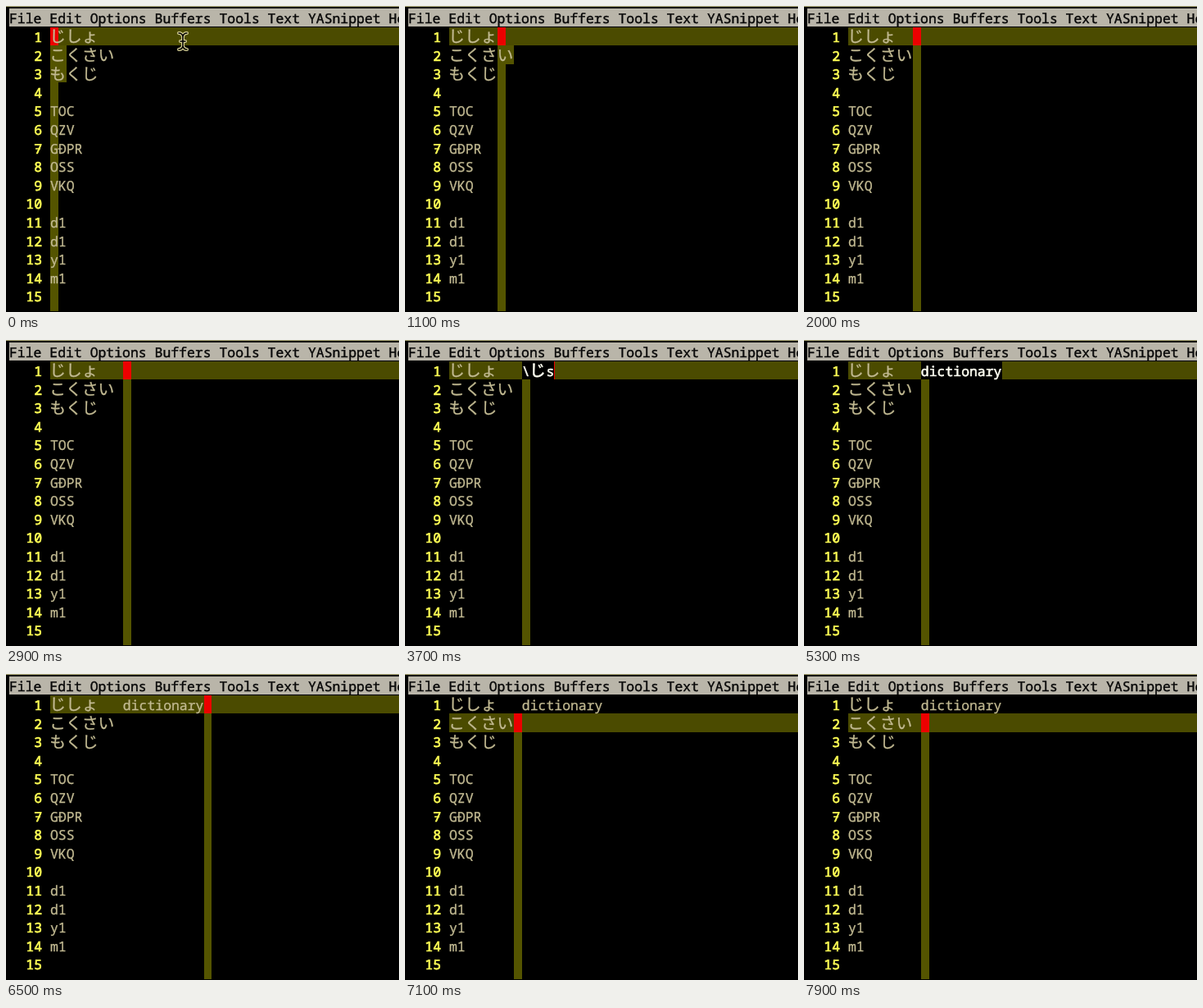
An HTML page for the animation above (8 s loop, 480 by 373 pixels).

```html
<!DOCTYPE html>
<html lang="ja">
<head>
<meta charset="utf-8">
<title>Dictionary input in a text editor</title>
<style>
  html, body { margin: 0; width: 100%; height: 100%; overflow: hidden; background: #000; }
  svg { display: block; width: 480px; height: 373px; }
  text { white-space: pre; text-rendering: geometricPrecision; fill: #c2ba92; stroke: #c2ba92; stroke-width: 0.3; }
  rect { shape-rendering: crispEdges; }
  .mono { font: 16.45px 'Noto Sans Mono', 'DejaVu Sans Mono', monospace; }
  .kana { font: 19.74px 'Noto Sans CJK JP', 'Noto Sans CJK', sans-serif; }
  .menu { fill: #080808; stroke: #080808; stroke-width: 0.4; }
  .num { fill: #ffff55; stroke: #ffff55; stroke-width: 0.7; }
  .typed text { fill: #fffff2; stroke: #fffff2; stroke-width: 0.6; }
  .list text { font: 19.1px Inter, 'Liberation Sans', sans-serif; fill: #000; stroke: none; }
  .list .tag { font: 16.5px Inter, 'Noto Sans CJK JP', sans-serif; fill: #938d62; }
  .list .hint { font: 18.4px Inter, 'Noto Sans CJK JP', sans-serif; }
  .row { fill: #4b4b00; }
  .col { fill: #545400; }
  .red { fill: #ec0000; }
</style>
</head>
<body>
<svg viewBox="0 0 480 373">
  <rect width="480" height="373"/>
  <rect width="480" height="1" fill="#a9a574"/>
  <rect x="4" y="3" width="476" height="22" fill="#b9b5a9"/>
  <text class="mono menu" x="4" y="21">File Edit Options Buffers Tools Text YASnippet Help</text>
  <g id="marks"></g>
  <g id="page"></g>
  <g id="typed" class="typed"></g>
  <g id="mouse" fill="none" stroke-linecap="round">
    <path id="beam" stroke="#d8d296" stroke-width="4" d="M211 33q4 0 5 4q1-4 5-4M216 37V49M211 53q4 0 5-4q1 4 5 4M213 43h6"/>
    <path stroke="#000" stroke-width="1.6" d="M211 33q4 0 5 4q1-4 5-4M216 37V49M211 53q4 0 5-4q1 4 5 4M213 43h6"/>
  </g>
  <g id="list" class="list">
    <rect x="137" y="48" width="343" height="156" fill="#c9c5a4"/>
    <rect x="138" y="49" width="342" height="128" fill="#fffff8"/>
    <rect x="138" y="178" width="342" height="25" fill="#f8f7dc"/>
    <rect x="138" y="176" width="342" height="2" fill="#7c1c10"/>
    <text class="hint" x="144.5" y="199">Tabキーで選択</text>
  </g>
</svg>
<script>
const CELL = 9.87, LINE = 22.6, LEFT = 54, TOP = 25.6, BASE = 18.4;
const LINES = ['じしょ', 'こくさい', 'もくじ', '', 'TOC', 'QZV', 'GÐPR', 'OSS', 'VKQ',
  '', 'd1', 'd1', 'y1', 'm1', ''];
const WORDS = ['dictionaryinternational', 'to urge to resign', 'lexicography',
  'the orientation of time and place', 'letter of resignation'];

// Each step: start time, cursor row, cursor column, and what is being composed.
const STEPS = [
  { at: 0, row: 0, col: 0, mouse: true },
  { at: 700, row: 0, col: 6 },
  { at: 1800, row: 0, col: 7 },
  { at: 2000, row: 0, col: 8 },
  { at: 2200, row: 0, col: 9 },
  { at: 3100, row: 0, col: 9, typed: '\\' },
  { at: 3400, row: 0, col: 9, typed: '\\j' },
  { at: 3500, row: 0, col: 9, typed: '\\じ' },
  { at: 3700, row: 0, col: 9, typed: '\\じs' },
  { at: 3800, row: 0, col: 9, typed: '\\じsy' },
  { at: 3900, row: 0, col: 9, typed: '\\じしょ' },
  { at: 4000, row: 0, col: 9, typed: '\\じしょ', list: true },
  { at: 4800, row: 0, col: 9, typed: 'dictionary', chosen: true },
  { at: 5900, row: 0, col: 19, done: true },
  { at: 6900, row: 1, col: 8, done: true },
  { at: 7400, row: 1, col: 9, done: true }
];

const get = id => document.getElementById(id);
const isWide = s => /[ぁ-ん]/.test(s);
const cells = s => [...s].reduce((n, c) => n + (isWide(c) ? 2 : 1), 0);

function add(parent, tag, attrs, content = '') {
  const el = document.createElementNS('http://www.w3.org/2000/svg', tag);
  for (const key in attrs) el.setAttribute(key, attrs[key]);
  el.textContent = content;
  parent.append(el);
  return el;
}

function block(parent, cls, row, col, width, height = LINE) {
  add(parent, 'rect', { class: cls, x: LEFT + col * CELL, y: TOP + row * LINE, width, height });
}

// Kana fill two cells, so each run of one kind is placed on the grid.
function put(parent, row, col, str) {
  for (const run of str.match(/[ぁ-ん]+|[^ぁ-ん]+/g) || []) {
    const wide = isWide(run);
    add(parent, 'text', {
      class: wide ? 'kana' : 'mono',
      x: LEFT + col * CELL - (wide ? 0.7 : 0),
      y: TOP + BASE + row * LINE + (wide ? 0.3 : 0)
    }, run);
    col += cells(run);
  }
}

const page = get('page');
LINES.forEach((line, row) => {
  put(page, row, 0, line);
  add(page, 'text', { class: 'mono num', x: 44, y: TOP + BASE + row * LINE, 'text-anchor': 'end' }, row + 1);
});
add(page, 'path', { d: 'M36 174h6', stroke: '#ffff55', 'stroke-width': 1.5 });
put(page, 0, 9, 'dictionary');
const word = page.lastChild;

WORDS.forEach((text, i) => {
  const y = 70 + i * 25.6;
  add(get('list'), 'text', { x: 142.5, y }, text);
  add(get('list'), 'text', { class: 'tag', x: 475, y: y - 1, 'text-anchor': 'end' }, '[半]');
});

function show(step) {
  const { row, col, typed } = step, marks = get('marks'), input = get('typed');
  marks.replaceChildren();
  input.replaceChildren();

  block(marks, 'row', row, 0, 480 - LEFT);
  block(marks, 'col', row + 1, col, CELL, 372 - TOP - (row + 1) * LINE);
  for (let r = row + 1; r < LINES.length; r++) {
    if (isWide(LINES[r]) && col < cells(LINES[r])) block(marks, 'col', r, col, CELL * 2);
  }

  if (typed) {
    const width = cells(typed);
    block(input, '', row, col, width * CELL);
    put(input, row, col, typed);
    if (!step.chosen) block(input, 'red', row, col + width, 1);
  } else {
    block(marks, 'red', row, col, CELL);
  }

  const toggle = (el, on) => { el.style.display = on ? '' : 'none'; };
  toggle(word, step.done);
  toggle(get('mouse'), step.mouse);
  toggle(get('list'), step.list);
}

let current;
function tick() {
  const t = performance.now() % 8000;
  const step = STEPS.findLast(s => s.at <= t);
  if (step !== current) show(current = step);
  requestAnimationFrame(tick);
}
tick();
</script>
</body>
</html>
```
